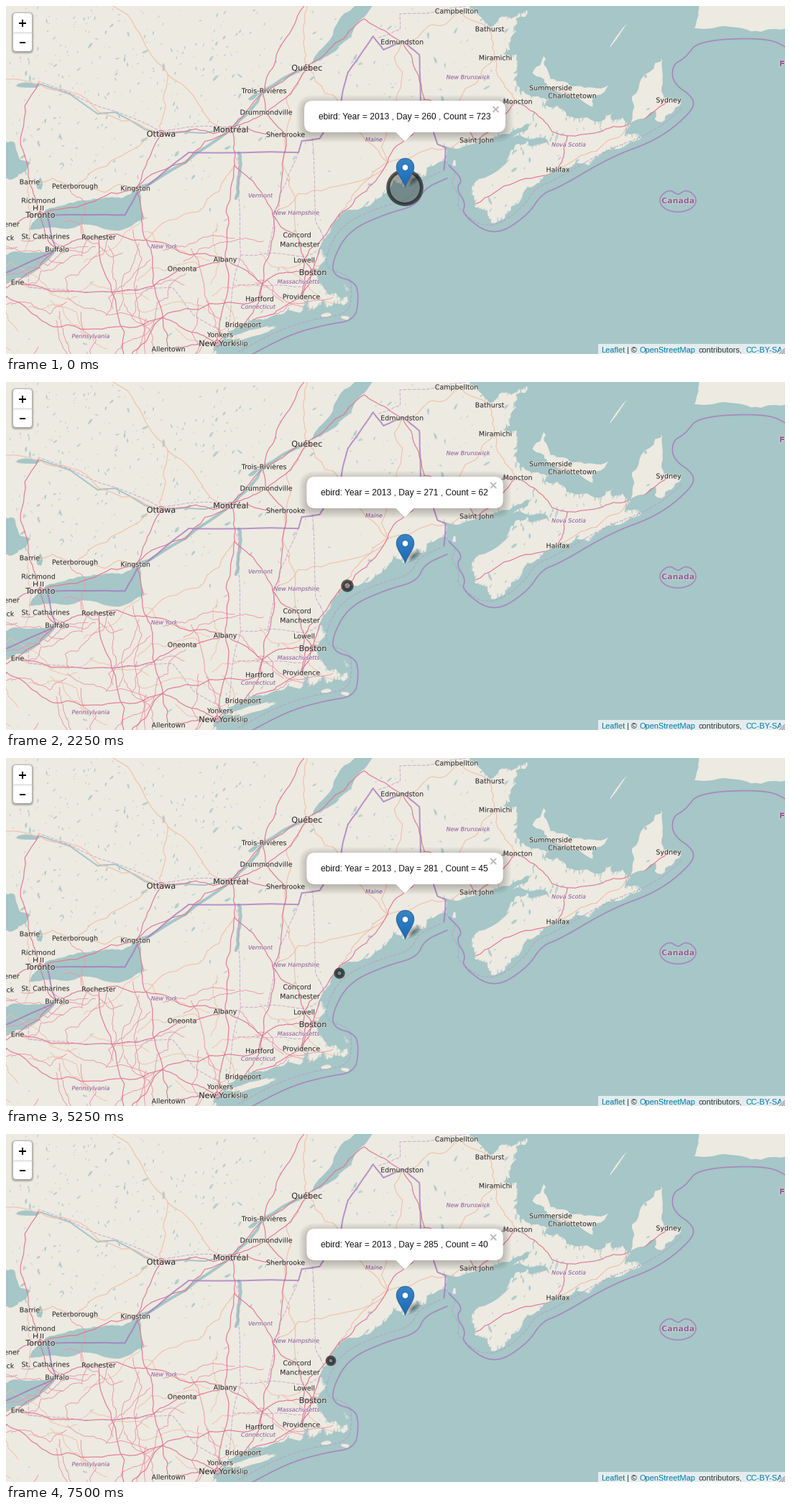
Animation of 1084 by 485 pixels, one loop 8000 ms. Source, as a matplotlib script:

```python
import numpy as np
import matplotlib.pyplot as plt
from matplotlib import patheffects
from matplotlib.animation import FuncAnimation
from matplotlib.collections import LineCollection, PolyCollection
from matplotlib.patches import Circle, Ellipse, FancyBboxPatch, PathPatch, Polygon
from matplotlib.path import Path

W, H, DPI = 1084, 485, 64
PT = 72 / DPI  # points per pixel
SEA, LAND = "#a6c6c7", "#edeae1"
PURPLE, PINK, ORANGE = "#a674bd", "#e2708f", "#f2bfa8"
INK, VIOLET, LINK = "#303030", "#91609f", "#0078a8"
TURN = np.linspace(0, 2 * np.pi, 81)
rng = np.random.default_rng(4)

fig = plt.figure(figsize=(W / DPI, H / DPI), dpi=DPI, facecolor=SEA)
ax = fig.add_axes([0, 0, 1, 1])
ax.set(xlim=(0, W), ylim=(H, 0))
ax.axis("off")
ax.set_autoscale_on(False)


def px(*v):
    return np.reshape(v, (-1, 2)).astype(float)


def geo(*v):
    """Web Mercator: pairs of degrees west and degrees north to pixels."""
    west, north = px(*v).T
    x = 427 - 45.51 * (west - 71.06)
    y = 370 - 2607.6 * (np.arcsinh(np.tan(np.radians(north))) - 0.81775)
    return np.column_stack([x, y])


def rough(p, amp=0.13, n=3):
    """Midpoint displacement."""
    for _ in range(n):
        d = np.diff(p, axis=0)
        out = np.empty((2 * len(p) - 1, 2))
        out[::2] = p
        out[1::2] = (p[:-1] + p[1:]) / 2 + d[:, ::-1] * [1, -1] * rng.normal(0, amp, (len(d), 1))
        p = out
    return p


def smooth(p, n=3):
    """Chaikin corner cutting with fixed ends."""
    for _ in range(n):
        a, b = p[:-1], p[1:]
        cut = np.stack([0.75 * a + 0.25 * b, 0.25 * a + 0.75 * b], 1).reshape(-1, 2)
        p = np.vstack([p[:1], cut, p[-1:]])
    return p


def ring(p, amp=0.12):
    return rough(np.vstack([p, p[:1]]), amp)


def blob(x, y, length, thin, angle, n=8):
    t = np.linspace(0, 2 * np.pi, n)[:-1]
    r = rng.uniform(0.6, 1.25, n - 1)
    u, v = length * r * np.cos(t), thin * r * np.sin(t)
    c, s = np.cos(angle), np.sin(angle)
    return np.column_stack([x + u * c - v * s, y + u * s + v * c])


def lines(paths, color, width, z, **kw):
    col = LineCollection(paths, colors=color, linewidths=width * PT, zorder=z,
                         capstyle="round", joinstyle="round", **kw)
    ax.add_collection(col)
    return col


# ---- places: label centres, which also serve as road junctions ----
CITIES = {"Ottawa": (216, 178), "Montréal": (313, 172), "Québec": (419, 86), "Boston": (427, 371),
          "Toronto": (48, 291), "New York": (294, 470)}
TOWNS = {"Campbellton": (627, 7), "Bathurst": (673, 32), "Edmundston": (551, 50),
         "Miramichi": (681, 72), "Trois-Rivières": (359, 118), "Drummondville": (362, 148),
         "Sherbrooke": (389, 179), "Moncton": (712, 133), "Summerside": (758, 114),
         "Charlottetown": (788, 125), "Sydney": (922, 131), "Saint John": (655, 187),
         "Halifax": (768, 228), "Barrie": (33, 245), "Peterborough": (96, 251),
         "Kingston": (180, 254), "Richmond": (45, 271), "Hill": (45, 282), "ener": (8, 304),
         "ock": (3, 323), "St. Catharines": (55, 321), "Rochester": (129, 322),
         "Buffalo": (71, 339), "Erie": (16, 385), "Oneonta": (245, 366), "Albany": (305, 353),
         "Concord": (405, 319), "Manchester": (409, 332), "Lowell": (415, 354),
         "Hartford": (353, 408), "Providence": (411, 405), "Bridgeport": (330, 444),
         "Yonkers": (298, 458), "Islip": (327, 470), "Allentown": (226, 478)}
REGIONS = {"New Brunswick": (643, 99), "Maine": (512, 186), "Vermont": (354, 264),
           "New Hampshire": (404, 288), "Nova Scotia": (783, 193), "New York": (220, 335),
           "Massachusetts": (407, 384), "Connecticut": (351, 419), "Pennsylvania": (118, 460)}
JUNCTIONS = {"Syracuse": (195, 326), "Binghamton": (206, 390), "Scranton": (218, 434),
             "Portland": (464, 290), "Bangor": (531, 218), "Fredericton": (628, 142),
             "Truro": (781, 181), "Yarmouth": (653, 276), "Plattsburgh": (318, 222),
             "Hanover": (371, 290), "Woodstock": (582, 130), "Canso": (867, 164),
             "Rivière-du-Loup": (498, 18), "Saguenay": (421, -8), "North Bay": (45, 108),
             "Mont-Laurier": (225, 95), "Val-d'Or": (111, -8), "Springfield": (357, 387),
             "Harrisburg": (166, 500), "Clearfield": (66, 447), "Sudbury": (-9, 102),
             "Cleveland": (-9, 400)}
NODES = CITIES | TOWNS | JUNCTIONS


def route(names):
    return px(*[NODES[n] for n in names.split(", ")])


MOTORWAYS = [
    "ener, Toronto, Kingston, Montréal",
    "Montréal, Drummondville, Québec, Rivière-du-Loup, Edmundston, Woodstock, Fredericton, Moncton, "
    "Truro, Canso, Sydney",
    "Montréal, Trois-Rivières, Québec",
    "Montréal, Ottawa, Kingston",
    "Montréal, Sherbrooke",
    "Toronto, Barrie, North Bay",
    "Toronto, St. Catharines, Buffalo",
    "Cleveland, Erie, Buffalo, Rochester, Syracuse, Albany, Springfield, Boston, Providence",
    "New York, Albany, Plattsburgh, Montréal",
    "Kingston, Syracuse, Binghamton, Scranton, Allentown, New York",
    "Erie, Binghamton, Oneonta, Albany",
    "Cleveland, Clearfield, Scranton, Hartford, Springfield",
    "Rochester, Harrisburg, Scranton, New York",
    "New York, Bridgeport, Providence, Boston, Portland, Bangor, Woodstock",
    "Bridgeport, Hartford, Springfield, Hanover, Sherbrooke, Drummondville, Trois-Rivières, Saguenay",
    "Boston, Lowell, Manchester, Concord, Hanover, Plattsburgh",
    "Fredericton, Saint John, Moncton",
    "Truro, Halifax, Yarmouth",
    "Providence, Lowell, Portland",
]
HIGHWAYS = [
    "Ottawa, North Bay, Sudbury",
    "Barrie, Peterborough, Ottawa, Mont-Laurier, Val-d'Or",
    "Peterborough, Kingston",
    "Montréal, Mont-Laurier",
    "Québec, Saguenay",
    "Québec, Sherbrooke, Concord",
    "Moncton, Miramichi, Bathurst, Campbellton, Edmundston",
    "Fredericton, Miramichi",
    "Bangor, Saint John",
    "Québec, Bangor, Portland",
    "Edmundston, Bangor",
    "Summerside, Charlottetown",
    "Syracuse, Plattsburgh",
    "Hanover, Bangor",
    "Halifax, Canso",
]

# ---- land ----
gulf = geo(
    66.37, 48.2, 66, 47.93, 65.65, 47.65, 65, 47.82, 64.5, 48, 64.85, 47.55, 65.2, 47.1,
    64.82, 47.06, 64.8, 46.7, 64.55, 46.25, 63.82, 46.13, 64.03, 46.02, 63.3, 45.78, 62.3, 45.66,
    61.88, 45.88, 61.9, 45.68, 61.35, 45.58, 61.5, 45.38, 61, 45.33)
nova = geo(
    61.6, 45.1, 62.5, 44.82, 63.5, 44.62, 63.95, 44.5, 64.25, 44.3, 65, 43.82, 65.6, 43.45,
    66.1, 43.8, 66.15, 44.3, 65, 45.05, 64.5, 45.25, 64.35, 45.13, 63.45, 45.37, 64.95, 45.33,
    64.3, 45.83, 65.2, 45.4, 66, 45.25)
maine = geo(
    67.05, 45.15, 66.97, 44.82, 67.6, 44.5, 68.3, 44.25, 68.6, 44.42, 69.05, 44, 69.8, 43.75,
    70.25, 43.6, 70.58, 43.2, 70.82, 42.87, 70.6, 42.66, 71, 42.35, 70.6, 41.85, 70.2, 41.75,
    70, 41.82, 70.15, 42.07, 69.95, 41.95, 69.95, 41.68, 70.65, 41.53, 70.75, 41.7, 71.2, 41.48,
    71.35, 41.75, 71.45, 41.42, 72.9, 41.25, 73.7, 40.95, 74.1, 40.65, 74, 40.42)
coast = rough(np.vstack([gulf, nova, maine]), 0.13)
mainland = np.vstack([coast, geo(74, 40.2, 82, 40.2, 82, 49, 66.37, 49)])
islands = [
    ring(geo(61.4, 45.6, 61.3, 46.2, 60.6, 46.9, 60.38, 47, 60.4, 46.3, 59.8, 46.05, 60.4, 45.65)),
    ring(geo(64, 47.05, 64.35, 46.7, 63.9, 46.4, 63.1, 46.18, 62.5, 45.98, 62.5, 46.2, 62, 46.45,
             63, 46.42, 63.8, 46.57)),
    ring(px(964, -6, 958, 31, 1000, 28, 1050, 36, 1095, 32, 1095, -6), 0.05),
    blob(343, 456, 45, 5, -0.27, 20),
    blob(447, 430, 8, 3, -0.2), blob(472, 434, 7, 3, 0.3), blob(624, 219, 3, 5, 0),
    blob(852, 41, 20, 1.2, -0.95),
]
outlines = [Path(np.vstack([p, p[:1]]), closed=True) for p in [mainland] + islands]
land = PathPatch(Path.make_compound_path(*outlines), fc=LAND, ec="none", zorder=1)
ax.add_patch(land)

# ---- flecks of water, lakes and rivers ----
flecks = []
while len(flecks) < 1000:
    x, y = rng.uniform(0, 900), rng.uniform(0, 485)
    if x > 640 and y > 160:
        density = 0.75
    elif y < 245:
        density = 1 - 0.55 * (x > 330) - 0.2 * (y > 130)
    else:
        density = 0.13
    if rng.random() < density:
        size = min(rng.lognormal(0.2, 0.55), 4)
        flecks.append(blob(x, y, size * 1.5, size * 0.5, rng.normal(1.9, 0.6)))
for x, y in coast[rng.random(len(coast)) < 0.5]:
    flecks.append(blob(x, y, rng.uniform(2, 7), 1, rng.normal(1.85, 0.3)))
water = PolyCollection(flecks, facecolors=SEA, alpha=0.8, zorder=2)
ax.add_collection(water)
water.set_clip_path(land)

lakes = [
    ring(geo(79.75, 43.3, 79.4, 43.63, 78.5, 43.9, 77.5, 44, 76.9, 44, 76.4, 44.2, 76.2, 43.55,
             77, 43.28, 78.8, 43.33), 0.06),
    ring(px(-8, 350, 30, 344, 72, 337, 58, 355, 15, 379, -8, 390), 0.05),
    ring(px(-8, 184, 12, 190, 34, 218, 16, 238, -8, 240)),
    ring(px(425, 82, 450, 48, 490, -6, 514, -6, 478, 44, 450, 68), 0.05),
    blob(47, 248, 6, 8, 0.3), blob(30, 110, 16, 4, 0), blob(345, 126, 9, 4, -0.6),
    blob(895, 158, 14, 6, -0.9),
]
ax.add_collection(PolyCollection(lakes, facecolors=SEA, zorder=2.1))
lines([rough(route("Québec, Trois-Rivières, Montréal, Kingston"), 0.03)], SEA, 4, 2.2)
lines([rough(px(324, 205, 325, 235, 320, 268), 0.06)], SEA, 4.5, 2.2)
lines([rough(route("Montréal, Ottawa, North Bay"), 0.08)], SEA, 2, 2.2)

# ---- roads ----
lanes = []
for _ in range(54):
    start = np.array([rng.uniform(0, 420), rng.uniform(320, 485)])
    turn = rng.uniform(0, 2 * np.pi) + rng.normal(0, 0.4, 5)
    steps = rng.uniform(12, 30, (5, 1)) * np.column_stack([np.cos(turn), np.sin(turn)])
    lanes.append(rough(np.vstack([start, start + np.cumsum(steps, 0)]), 0.08))
lines(lanes[:18], ORANGE, 0.9, 2.3).set_clip_path(land)
lines(lanes[18:], "#eb96a8", 0.9, 2.3).set_clip_path(land)
lines([rough(route(r), 0.08, 4) for r in HIGHWAYS], ORANGE, 1.1, 2.4).set_clip_path(land)
lines([rough(route(r), 0.05, 4) for r in MOTORWAYS], PINK, 1.2, 2.5, alpha=0.9).set_clip_path(land)
beltway = 4.5 * np.column_stack([np.cos(TURN[::10]), np.sin(TURN[::10])])
lines([rough(beltway + c, 0.15, 2) for c in CITIES.values()], PINK, 1.1, 2.5)

# ---- borders ----
border = geo(
    82, 41.95, 80.4, 42.35, 78.9, 42.85, 79.05, 43.15, 79.19, 43.63, 76.8, 43.63, 76.45, 44.1,
    74.85, 45, 71.5, 45, 71.4, 45.25, 70.85, 45.3, 70.25, 45.95, 69.99, 46.7, 69.22, 47.46,
    68.9, 47.18, 68.3, 47.36, 67.8, 47.07, 67.79, 45.7, 67.45, 45.6, 67.25, 45.18, 67, 45.1,
    67.05, 44.62)
lines([rough(border, 0.01)], PURPLE, 2, 3, alpha=0.75)
east = smooth(px(1090, 60, 1060, 44, 963, 48, 946, 72, 927, 82, 928, 108, 958, 128, 955, 147,
                 908, 186, 842, 210, 770, 253, 746, 261, 725, 293, 678, 322, 634, 290, 640, 275,
                 626, 254, 636, 242, 616, 222))
south = smooth(px(614, 240, 582, 254, 572, 278, 530, 289, 478, 312, 455, 352, 455, 376, 486, 384,
                  491, 405, 486, 438, 445, 444, 394, 458, 330, 492))
dent = np.where(np.sin(TURN) < 0, 0.45 * np.exp(-10 * np.cos(TURN) ** 2), 0)
lobes = np.column_stack([935 + 25 * np.cos(TURN), 271 + 16 * np.sin(TURN) * (1 - dent)])
lines([east, south, lobes], PURPLE, 1.7, 3, alpha=0.75)
states = [
    geo(79.76, 42.3, 79.76, 42, 75.35, 42, 74.7, 41.36, 73.9, 41),
    geo(73.35, 45, 73.27, 42.74, 73.5, 42.05, 73.65, 41),
    geo(73.5, 42.05, 71.38, 42.02),
    geo(73.27, 42.74, 71.3, 42.7, 70.82, 42.87),
    geo(71.5, 45.01, 72.05, 44.1, 72.45, 42.73),
    geo(71.08, 45.3, 70.98, 43.5, 70.7, 43.07),
    geo(69.05, 47.43, 68.4, 47.6, 68.4, 47.92, 67.6, 47.93, 66.4, 48.08),
    route("Montréal, Ottawa, North Bay") + (0, -3),
]
lines([rough(p, 0.02) for p in states] + [south - 9, east[60:] - (8, 9)], "#c094cb", 1, 2.9,
      linestyles=(0, (4, 2.5)), alpha=0.75)


# ---- labels ----
def label(s, x, y, size, color=INK, ha="center", z=4, halo=True, font="DejaVu Sans", **kw):
    t = ax.text(x, y + 0.36 * size, s, fontsize=size * PT, color=color, ha=ha, va="baseline",
                zorder=z, family=font, **kw)
    if halo:
        t.set_path_effects([patheffects.withStroke(linewidth=1.8, foreground=LAND, alpha=0.65)])
    return t


for group, size, color, style in ((TOWNS, 9.5, INK, "normal"), (CITIES, 11.2, INK, "normal"),
                                  (REGIONS, 8, VIOLET, "italic")):
    for name, (x, y) in group.items():
        label(name, x, y, size, color, style=style)
label("Canada", 935, 271, 11, VIOLET, weight="bold")
label("F", 1080, 80, 11, VIOLET, weight="bold")


# ---- pin, popup and controls ----
def box(x, y, w, h, radius, z, **kw):
    p = FancyBboxPatch((x, y), w, h, boxstyle=f"round,pad=0,rounding_size={radius}",
                       ec="none", zorder=z, **kw)
    return ax.add_patch(p)


def stroke(points, color, width, z):
    return ax.plot(*px(*points).T, color=color, lw=width * PT, zorder=z, solid_capstyle="butt")[0]


spot_fill = ax.add_patch(Circle((0, 0), 1, fc="black", alpha=0.3, ec="none", zorder=6))
spot_ring = ax.add_patch(Circle((0, 0), 1, fc="none", ec=(0.1, 0.1, 0.1, 0.7), lw=5 * PT, zorder=6))

for k in range(1, 7):
    ax.add_patch(Ellipse((567, 242), 4.6 * k, 2.1 * k, angle=-38, fc="black", alpha=0.075,
                         ec="none", zorder=7))
pin_path = Path(px(555.5, 252.5, 553, 243, 543.3, 234, 543.3, 224.5, 543.3, 217.7, 548.7, 212.3,
                   555.5, 212.3, 562.3, 212.3, 567.7, 217.7, 567.7, 224.5, 567.7, 234, 558, 243,
                   555.5, 252.5), [Path.MOVETO] + [Path.CURVE4] * 12)
pin = ax.add_patch(PathPatch(pin_path, fc="none", ec="#2c6799", lw=PT, zorder=8.1))
shade = np.linspace([0.22, 0.52, 0.77], [0.1, 0.41, 0.74], 32)[:, None, :]
ax.imshow(shade, extent=(543, 568, 253, 212), aspect="auto", zorder=8).set_clip_path(pin)
ax.add_patch(Circle((555.5, 225), 4.3, fc="white", ec="#2c6799", lw=0.8, zorder=8.2))

SPREAD = range(-2, 12)
shadows = [box(0, 0, 10, 10, 12 + e, 9, fc="black", alpha=0.016) for e in SPREAD]
popup = box(0, 0, 10, 10, 12, 9.2, fc="white")
ax.add_patch(Polygon(px(542, 175.5, 568, 175.5, 555, 188.5), fc="white", ec="none", zorder=9.2))
message = label("", 0, 154, 12, "#111111", "left", 9.3, False, "Liberation Sans")
cross = [stroke((0, 0, 1, 1), "#b9b9b9", 1.9, 9.3) for _ in range(2)]

for e in range(4):
    box(10 - e, 11 - e, 26 + 2 * e, 53 + 2 * e, 4 + e, 10, fc="black", alpha=0.09)
box(10, 10, 26, 53, 4, 10.1, fc="white")
stroke((10, 36.5, 36, 36.5), "#cccccc", 1, 10.2)
for bar in ((18, 24, 28, 24), (23, 19, 23, 29), (19, 51, 27, 51)):
    stroke(bar, "black", 2, 10.2)

ax.add_patch(Polygon(px(824, 471, W, 471, W, H, 824, H), fc="white", alpha=0.7, ec="none", zorder=10))
for s, x, color in (("Leaflet", 828, LINK), ("| ©", 864, "#333333"), ("OpenStreetMap", 882, LINK),
                    ("contributors,", 963, "#333333"), ("CC-BY-SA", 1029, LINK)):
    label(s, x, 479, 11, color, "left", 10.1, False, "Liberation Sans")
ax.add_patch(Polygon(px(W, 474, W, H, 1073, H), fc="#ececec", ec="none", zorder=10.2))
for d in (2, 5, 8):
    stroke((W - d, H, W, H - d), "#8c8c8c", 1, 10.3)

# start tick, day, count, x, y
TICK = 250
SIGHTINGS = [(0, 260, 723, 555, 253), (3, 266, 25, 509, 237), (6, 267, 508, 509, 284),
             (9, 271, 62, 475, 284), (12, 273, 79, 464, 300), (18, 279, 34, 452, 300),
             (21, 281, 45, 464, 300), (24, 283, 81, 464, 284), (27, 284, 52, 452, 300),
             (30, 285, 40, 452, 316)]


def update(tick):
    _, day, count, x, y = [s for s in SIGHTINGS if s[0] <= tick][-1]
    for c in (spot_fill, spot_ring):
        c.set_center((x, y))
        c.set_radius(0.9 * (np.sqrt(count) - 1))
    width = 260 + 6.67 * len(str(count))
    left, right = 555 - width / 2, 555 + width / 2
    popup.set_bounds(left, 132, width, 44)
    for e, s in zip(SPREAD, shadows):
        s.set_bounds(left - e, 135 - e, width + 2 * e, 44 + 2 * e)
    message.set_text(f"ebird: Year = 2013 , Day = {day} , Count = {count}")
    message.set_x(left + 20)
    cx = right - 13.5
    cross[0].set_data([cx - 4, cx + 4], [140, 148])
    cross[1].set_data([cx - 4, cx + 4], [148, 140])
    return [popup, message, spot_fill, spot_ring, *shadows, *cross]


anim = FuncAnimation(fig, update, frames=32, interval=TICK, repeat=True)
plt.show()
```
